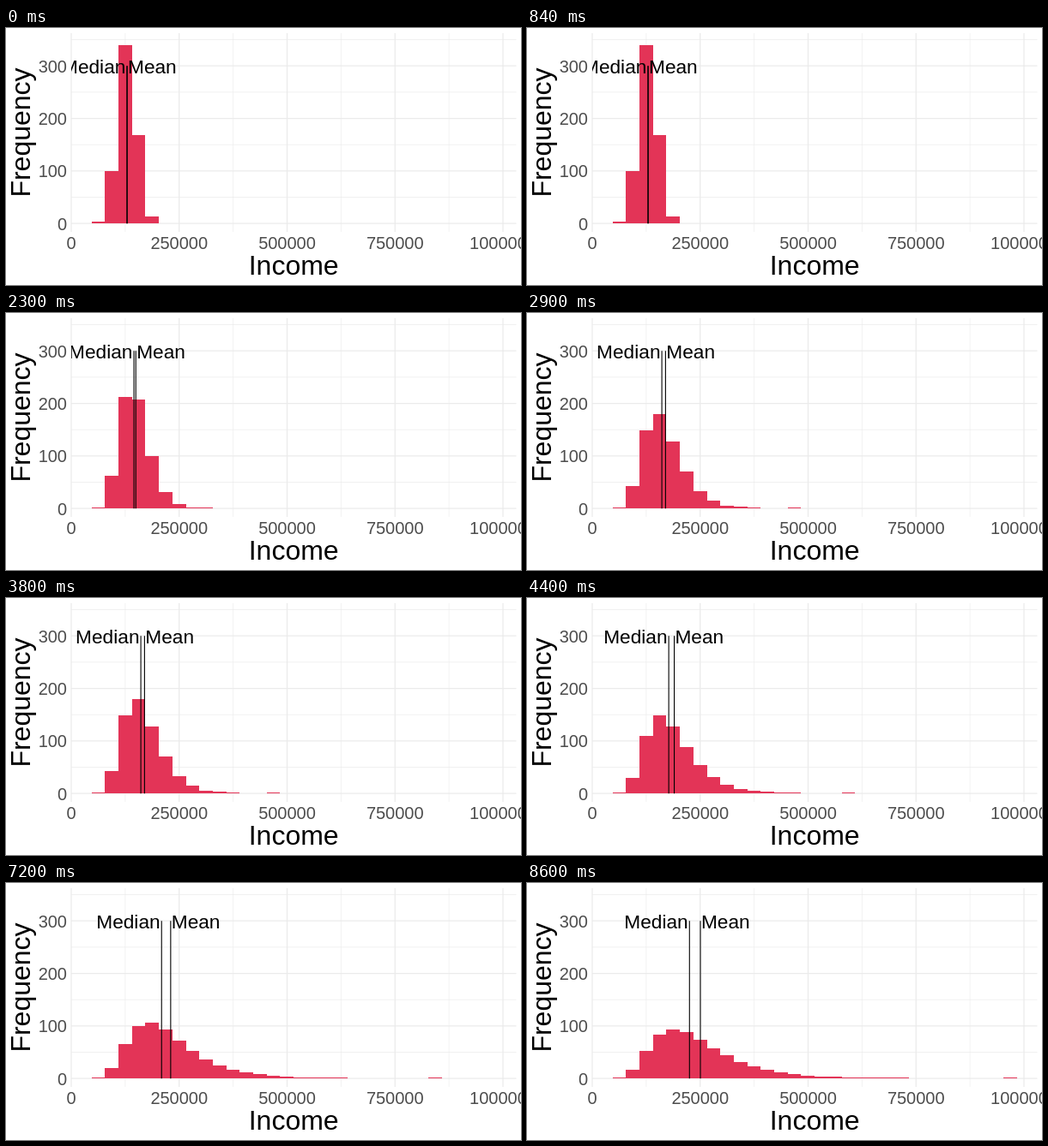
These frames come from a looping animation (600 px wide and 300 px high, 10000 ms). An HTML page:

```html
<!DOCTYPE html>
<html lang="en">
<head>
<meta charset="utf-8">
<title>Income histogram</title>
<style>
  html, body { margin: 0; width: 100%; height: 100%; overflow: hidden; background: #fff; }
  svg { display: block; width: 600px; height: 300px; font-family: "Liberation Sans", Arial, sans-serif; }
  .grid { stroke: #ebebeb; fill: none; }
  .tick { font-size: 20px; fill: #4d4d4d; }
  .title { font-size: 32px; text-anchor: middle; }
  .label { font-size: 22.7px; }
  .mid { text-anchor: middle; }
  .end { text-anchor: end; }
  #bars { fill: #e33457; shape-rendering: crispEdges; }
  .stat { stroke: #000; stroke-width: 1.1; }
</style>
</head>
<body>
<svg viewBox="0 0 600 300">
  <clipPath id="panel"><rect x="76" y="6" width="518.5" height="232"/></clipPath>
  <g id="axes"></g>
  <g clip-path="url(#panel)">
    <path id="bars"/>
    <g id="median">
      <path class="stat" d="M0 44.2V228.2"/>
      <text class="label end" x="-1.6" y="53">Median</text>
    </g>
    <g id="mean">
      <path class="stat" d="M0 44.2V228.2"/>
      <text class="label" x="0.9" y="53">Mean</text>
    </g>
  </g>
  <text class="title" x="335.2" y="288">Income</text>
  <text class="title" transform="translate(28 122) rotate(-90)">Frequency</text>
</svg>
<script>
const $ = id => document.getElementById(id);
const LOOP = 10000;
const starts = [0, 1400, 2900, 4400, 5800, 7200, 8600];
const LEFT = 99.6, BIN = 15.7, BINS = 30, PEOPLE = 625;

const xAt = income => 76 + income * 0.000503;
const yAt = n => 228.2 - n * 0.6133;
const medianX = step => 141 + 8.05 * step;
const meanX = step => 141.1 + 10.15 * step;

function drawAxes() {
  let minor = "", major = "", text = "";
  const vLine = x => `M${x} 6V238`, hLine = y => `M76 ${y}H594.5`;
  for (let v = 0; v <= 1000000; v += 250000) {
    major += vLine(xAt(v));
    if (v < 1000000) minor += vLine(xAt(v + 125000));
    text += `<text class="tick mid" x="${xAt(v)}" y="258">${v}</text>`;
  }
  for (let n = 0; n <= 300; n += 100) {
    major += hLine(yAt(n));
    minor += hLine(yAt(n + 50));
    text += `<text class="tick end" x="71" y="${yAt(n) + 7.4}">${n}</text>`;
  }
  $("axes").innerHTML =
    `<path class="grid" stroke-width="0.7" d="${minor}"/>` +
    `<path class="grid" stroke-width="1.3" d="${major}"/>` + text;
}

// normal cumulative distribution, logistic approximation
const normal = z => 1 / (1 + Math.exp(-1.5976 * z - 0.07056 * z ** 3));

// Shifted log-normal, measured in bins: the spread grows steadily while the skew levels off.
function incomeShare(step) {
  const mid = (medianX(step) - LEFT) / BIN;
  const skew = 0.01 + 0.44 * (1 - Math.exp(-0.65 * step));
  const scale = (0.66 + 0.39 * step) / Math.sinh(skew);
  return u => normal(Math.log(Math.max(1e-9, 1 + (u - mid) / scale)) / skew);
}

function barPath(step) {
  const share = incomeShare(step);
  const richest = Math.floor(4.6 + 4.2 * step);
  let d = "";
  for (let i = 0; i < BINS; i++) {
    let n = Math.round(PEOPLE * (share(i + 1) - share(i)));
    if (i === richest) n = Math.max(n, 1);
    // a single person still gets a visible sliver
    if (n && i <= richest) d += `M${LEFT + i * BIN} ${yAt(0)}V${yAt(Math.max(n, 2))}h${BIN}V${yAt(0)}z`;
  }
  return d;
}

function show(step) {
  $("bars").setAttribute("d", barPath(step));
  $("median").setAttribute("transform", `translate(${medianX(step)} 0)`);
  $("mean").setAttribute("transform", `translate(${meanX(step)} 0)`);
}

let current = -1;
function tick() {
  const t = performance.now() % LOOP;
  const step = starts.filter(s => s <= t).length - 1;
  if (step !== current) show(current = step);
  requestAnimationFrame(tick);
}

drawAxes();
tick();
</script>
</body>
</html>
```
